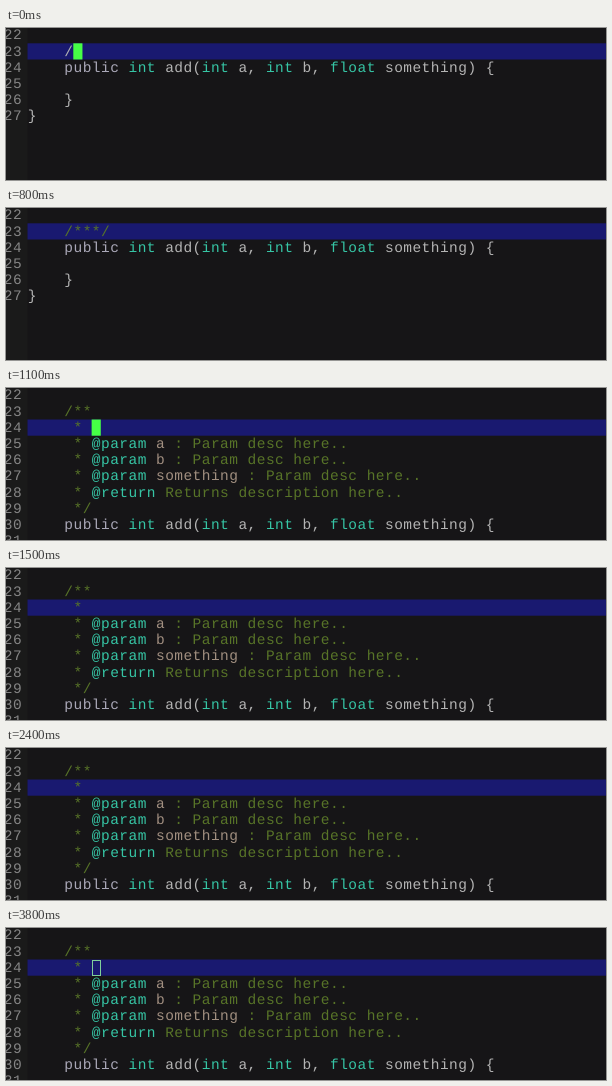
Animation, 600 px wide and 152 px high, one loop 4000 ms. Source, as an HTML page with a canvas:

```html
<!DOCTYPE html>
<html lang="en">
<head>
<meta charset="utf-8">
<title>Doc comment expansion</title>
<style>
  html, body { margin: 0; width: 100%; height: 100%; overflow: hidden; background: #161517; }
  canvas { display: block; width: 600px; height: 152px; }
</style>
</head>
<body>
<canvas id="stage" width="600" height="152"></canvas>
<script>
const canvas = document.getElementById('stage');
const ctx = canvas.getContext('2d');
const LOOP = 4000, CELL = 9.16, ROW = 16.2, LEFT = 21.5, TOP = -0.9, FIRST = 22;
const SIZE = 14.5, INSET = (CELL - SIZE * 0.6) / 2;
const COLOR = {
  back: '#161517', gutter: '#1a1a1a', line: '#191970', number: '#858585',
  cursor: '#46ff46', hollow: '#7fd09a',
  text: '#b4b4b4', key: '#aaa8b8', type: '#36c5a5', note: '#587428', name: '#a18f80'
};

const plain = s => [[s, 'text']];
const note = s => [[s, 'note']];
const signature = [
  ['    public ', 'key'], ['int', 'type'], [' add(', 'text'], ['int', 'type'], [' a, ', 'text'],
  ['int', 'type'], [' b, ', 'text'], ['float', 'type'], [' something) {', 'text']
];
const param = name => [
  ['     * ', 'note'], ['@param ', 'type'], [name, 'name'], [' : Param desc here..', 'note']
];
const expanded = [
  [], note('    /**'), note('     *'), param('a'), param('b'), param('something'),
  [['     * ', 'note'], ['@return', 'type'], [' Returns description here..', 'note']],
  note('     */'), signature, []
];

// An unclosed comment swallows the code below it.
function typed(text) {
  const open = text.length > 1 && !text.endsWith('*/');
  const lines = [[], text === '/' ? plain('    /') : note('    ' + text), signature, [], plain('    }'), plain('}')];
  return open ? lines.map(line => line.map(([s]) => [s, 'note'])) : lines;
}

// [start, typed text or null once expanded, cursor]
const steps = [
  [0, '/', 'solid'], [100, '/*', 'solid'], [200, '/**', 'solid'], [300, '/***', 'solid'],
  [400, '/***/', 'solid'], [800, '/***/', 'off'],
  [900, null, 'solid'], [1400, null, 'off'], [1900, null, 'solid'], [2400, null, 'off'],
  [2900, null, 'solid'], [3400, null, 'off'], [3600, null, 'hollow']
];

const rowTop = row => TOP + row * ROW;

function fill(color, x, y, w, h) {
  ctx.fillStyle = color;
  ctx.fillRect(x, y, w, h);
}

function write(text, x, row, color) {
  ctx.fillStyle = color;
  [...text].forEach((ch, i) => {
    if (ch !== ' ') ctx.fillText(ch, x + i * CELL + INSET, rowTop(row) + 12.3);
  });
}

function draw([, text, cursor]) {
  const lines = text === null ? expanded : typed(text);
  const row = text === null ? 2 : 1;
  const col = text === null ? 7 : 4 + text.length;
  const x = LEFT + col * CELL, y = rowTop(row);

  fill(COLOR.back, 0, 0, 600, 152);
  fill(COLOR.gutter, 0, 0, LEFT, 152);
  fill(COLOR.line, LEFT, y, 600 - LEFT, ROW);

  lines.forEach((line, r) => {
    write(String(FIRST + r), -2.4, r, COLOR.number);
    let at = 0;
    for (const [s, kind] of line) {
      write(s, LEFT + at * CELL, r, COLOR[kind]);
      at += s.length;
    }
  });

  if (cursor === 'solid') {
    fill(COLOR.cursor, x, y, CELL, ROW);
  } else if (cursor === 'hollow') {
    ctx.strokeStyle = COLOR.hollow;
    ctx.strokeRect(Math.round(x) + 0.5, Math.round(y) + 0.5, 8, 15);
  }
}

ctx.font = `${SIZE}px "Liberation Mono", "Courier New", monospace`;
ctx.textRendering = 'geometricPrecision';
const start = performance.now();
let shown;

function frame() {
  const t = (performance.now() - start) % LOOP;
  const step = steps.findLast(s => s[0] <= t);
  if (step !== shown) draw(shown = step);
  requestAnimationFrame(frame);
}
frame();
</script>
</body>
</html>
```
